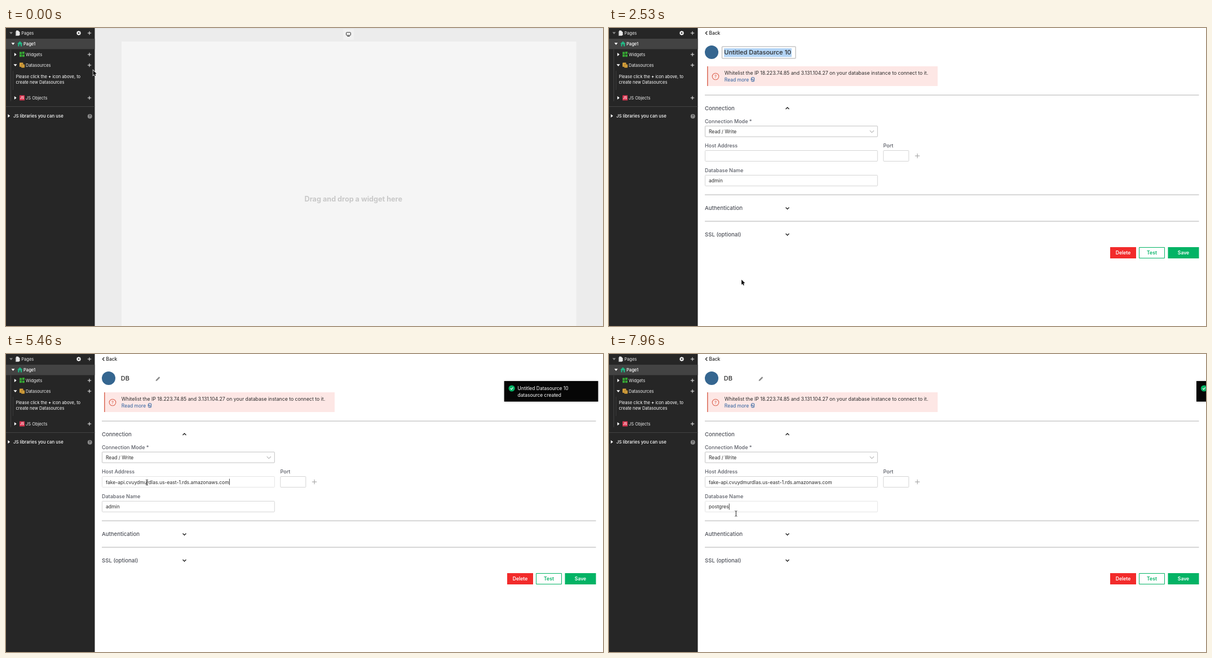
These frames come from a looping animation (1059x529 px, 7.99 s). An HTML page with a canvas:

```html
<!DOCTYPE html>
<html lang="en">
<head>
<meta charset="utf-8">
<title>Connect a datasource</title>
<style>
html, body { margin: 0; width: 100%; height: 100%; overflow: hidden; background: #fff; }
canvas { display: block; width: 1059px; height: 529px; }
</style>
</head>
<body>
<canvas id="stage"></canvas>
<script>
const W = 1059, H = 529, LOOP = 7990;
const canvas = document.getElementById('stage');
const dpr = window.devicePixelRatio || 1;
canvas.width = W * dpr;
canvas.height = H * dpr;
const c = canvas.getContext('2d');

const GREEN = '#03b365', ORANGE = '#e3723c', PG = '#356690', INK = '#2b2b2b';
const HOST = 'fake-api.cvuydmurdlas.us-east-1.rds.amazonaws.com';

// Drawing helpers
function rect(x, y, w, h, fill) {
  c.fillStyle = fill;
  c.fillRect(x, y, w, h);
}
function box(x, y, w, h, fill, stroke, r = 0, lw = 1) {
  c.beginPath();
  c.roundRect(x, y, w, h, r);
  if (fill) { c.fillStyle = fill; c.fill(); }
  if (stroke) { c.strokeStyle = stroke; c.lineWidth = lw; c.stroke(); }
}
function disc(x, y, r, fill, stroke, lw = 1) {
  c.beginPath();
  c.arc(x, y, r, 0, Math.PI * 2);
  if (fill) { c.fillStyle = fill; c.fill(); }
  if (stroke) { c.strokeStyle = stroke; c.lineWidth = lw; c.stroke(); }
}
function line(pts, color, lw = 1) {
  c.beginPath();
  for (let i = 0; i < pts.length; i += 2) c.lineTo(pts[i], pts[i + 1]);
  c.strokeStyle = color;
  c.lineWidth = lw;
  c.stroke();
}
function poly(pts, fill, stroke, lw = 1) {
  c.beginPath();
  for (let i = 0; i < pts.length; i += 2) c.lineTo(pts[i], pts[i + 1]);
  c.closePath();
  if (stroke) { c.strokeStyle = stroke; c.lineWidth = lw; c.stroke(); }
  c.fillStyle = fill;
  c.fill();
}
// y is the middle of the capitals; returns the right edge
function text(s, x, y, size, color, weight = 400) {
  c.font = `${weight} ${size}px Inter, Roboto, sans-serif`;
  c.fillStyle = color;
  c.fillText(s, x, y + size * 0.36);
  return x + c.measureText(s).width;
}
function centered(s, x, y, size, color, weight) {
  c.textAlign = 'center';
  text(s, x, y, size, color, weight);
  c.textAlign = 'left';
}
function plus(x, y, r, color, lw = 1) {
  line([x - r, y, x + r, y], color, lw);
  line([x, y - r, x, y + r], color, lw);
}
function chevron(x, y, w, dir, color, lw) {
  line([x - w, y - w / 2 * dir, x, y + w / 2 * dir, x + w, y - w / 2 * dir], color, lw);
}
function caretRight(x, y, color) { poly([x - 1.7, y - 3, x - 1.7, y + 3, x + 2.2, y], color); }
function caretDown(x, y, color) { poly([x - 3, y - 1.8, x + 3, y - 1.8, x, y + 2], color); }
function tick(x, y, r, color, lw) {
  line([x - r * 0.5, y, x - r * 0.1, y + r * 0.4, x + r * 0.5, y - r * 0.35], color, lw);
}

// Sidebar
function gear(x, y) {
  for (let i = 0; i < 4; i++) {
    const a = i * Math.PI / 4, dx = Math.cos(a) * 4, dy = Math.sin(a) * 4;
    line([x - dx, y - dy, x + dx, y + dy], '#eee', 1.7);
  }
  disc(x, y, 3.1, '#eee');
  disc(x, y, 1.3, '#262626');
}
function sidebar(t) {
  const hover = t >= 60 && t < 2530, onPlus = hover && t < 1200;
  rect(0, 0, 157.5, H, '#262626');
  rect(0, 19, 157.5, 18.5, '#434343');
  if (hover) rect(0, 56.5, 157.5, 19, '#373737');
  if (onPlus) rect(138.5, 56.5, 19, 19, '#1c1c1c');
  line([8.5, 38, 8.5, 130], '#414141');
  line([12.5, 76, 12.5, 110], '#3a3a3a');
  line([0, 139.5, 157.5, 139.5], '#434343');

  caretDown(9, 9, '#888');
  poly([18, 4.5, 21.5, 4.5, 24.5, 7.5, 24.5, 13, 18, 13], '#e8e8e8');
  line([17.3, 6, 17.3, 13.5, 23, 13.5], '#aaa');
  text('Pages', 27.3, 9, 7.5, '#eee');
  gear(129, 9);
  caretDown(12.5, 28, '#fff');
  poly([20, 28, 24.7, 23.6, 29.4, 28, 28.2, 28, 28.2, 32.5, 25.9, 32.5, 25.9, 29, 23.5, 29, 23.5, 32.5, 21.3, 32.5, 21.3, 28], '#22b583');
  text('Page1', 31, 28, 7.6, '#fff', 500);

  caretRight(16.5, 47, '#fff');
  for (const [x, y] of [[24, 42.5], [28.8, 42], [24, 47.2], [28.8, 47.2]]) rect(x, y, 4, 4, '#36a733');
  text('Widgets', 35, 47, 7.5, '#eee');
  caretDown(16.5, 66, '#fff');
  box(24, 61.5, 6.5, 7.5, '#d9a13b', null, 1);
  box(27, 64.5, 6, 6, '#f0b648', '#6b4e17', 1, 0.6);
  line([28.3, 66.5, 31.7, 66.5], '#6b4e17', 0.7);
  line([28.3, 68.6, 31.7, 68.6], '#6b4e17', 0.7);
  text('Datasources', 35, 66, 7.5, '#eee');
  let x = text('Please click the ', 17.5, 86.3, 7.5, '#fff');
  x = text('+', x, 86.3, 7.5, '#fff', 700);
  text(' icon above, to', x, 86.3, 7.5, '#fff');
  text('create new Datasources', 17.5, 96.6, 7.5, '#fff');
  caretRight(16.5, 124, '#fff');
  rect(24, 119.5, 9, 9, '#d9344f');
  centered('JS', 28.5, 124.4, 5.5, '#fff', 600);
  text('JS Objects', 35, 124, 7.5, '#eee');
  for (const y of [9, 47, 66, 124]) plus(148, y, 3.2, '#eee');
  caretRight(5, 156, '#fff');
  text('JS libraries you can use', 13, 156, 7.8, '#fff', 500);
  disc(148.7, 156.7, 4, '#8a8a8a');
  centered('?', 148.7, 156.9, 6, '#262626', 600);
}

// Pages
function emptyCanvas() {
  rect(157, 0, W - 157, H, '#ececec');
  rect(157, 0, W - 157, 1.5, '#e3e3e3');
  rect(205, 24, 806.5, H, '#f5f5f5');
  box(598, 2, 19, 19, '#f1f1f1');
  box(603.6, 7.8, 7.8, 5.2, null, '#333', 0.8);
  line([605.3, 14.6, 609.7, 14.6], '#333', 1.1);
  text('Drag and drop a widget here', 529.5, 303, 12.65, '#c8c8c8', 700);
}
function back() {
  line([174.3, 6, 171.3, 9, 174.3, 12], '#222', 1.2);
  text('Back', 177.5, 9, 8.3, '#222', 500);
}
function shield(x, y) {
  c.beginPath();
  c.moveTo(x, y - 7.5);
  c.lineTo(x + 6.5, y - 5);
  c.quadraticCurveTo(x + 7, y + 4, x, y + 8);
  c.quadraticCurveTo(x - 7, y + 4, x - 6.5, y - 5);
  c.fillStyle = '#0bac63';
  c.fill();
  tick(x, y, 5.5, '#fff', 1.5);
}
function drum(x, y) {
  for (let i = 2; i >= 0; i--) {
    const yy = y + i * 4.6 - 4.6;
    c.beginPath();
    c.ellipse(x, yy + 2, 6.8, 2.6, 0, 0, Math.PI);
    c.ellipse(x, yy - 1, 6.8, 2.6, 0, Math.PI, 0);
    c.fillStyle = '#b9b9b9';
    c.fill();
    c.beginPath();
    c.ellipse(x, yy - 1, 6.8, 2.4, 0, 0, Math.PI * 2);
    c.fillStyle = '#d6d6d6';
    c.fill();
  }
}
function illustration() {
  disc(867, 142, 30, null, '#dcdcdc', 1.2);
  drum(883, 122);
  drum(840, 157);
  drum(889.5, 161);
  for (const [x, y, r, color] of [[878.5, 115.5, 4, PG], [845, 149.5, 3, '#3f9c46'], [895, 155, 3, '#7d97a8']]) {
    disc(x, y, 7, '#f6f6f6', '#d8d8d8', 0.8);
    disc(x, y, r, color);
  }
  rect(859, 134.5, 16, 16.5, '#e8562f');
  disc(871.3, 135, 4, '#5fba2f');
  tick(871.3, 135, 3.6, '#fff', 0.9);
}
function item(x, y, name, shape, color) {
  disc(x, y, 12.5, '#ececec');
  if (shape === 'disc') disc(x, y, 8, color);
  if (shape === 'square') rect(x - 7.5, y - 7.5, 15, 15, color);
  if (shape === 'plus') plus(x, y, 6, '#111', 2.6);
  if (shape === 'cloud') {
    disc(x - 4, y + 1.3, 3.8, color);
    disc(x - 0.3, y - 1.4, 4.7, color);
    disc(x + 4.4, y + 1.6, 3.5, color);
    rect(x - 4, y + 1, 8.4, 4.1, color);
  }
  text(name, x + 17.7, y, 9.65, INK, 500);
}
function catalog(t) {
  back();
  text('Datasources', 170, 39.5, 11.45, INK, 500);
  text('Active', 170, 73.3, 8.5, '#8a8a8a');
  plus(215.2, 73, 3.2, '#777', 0.9);
  text('Create New', 222, 73.3, 8.35, '#222', 600);
  rect(212, 80.6, 58, 1.5, ORANGE);

  box(170.7, 90.5, 749, 99.2, '#fff', '#cbcbcb', 0, 1.4);
  shield(192.5, 115.5);
  text('Secure & fast database connection', 205.5, 116, 14.27, INK, 600);
  text('Connect your database to start building read/write', 186, 136.8, 8.46, '#4c4c4c');
  text('workflows. Your Passwords are fully encrypted and we', 186, 149.4, 8.46, '#4c4c4c');
  text('never store any of your data. That’s a promise.', 186, 162, 8.46, '#4c4c4c');
  illustration();

  for (const [s, y] of [['Sample Databases', 211.5], ['APIs', 297.5], ['Databases', 422.5]])
    text(s, 170, y, 10.75, INK, 500);
  disc(189, 238, 6, '#4aa24c');
  text('movies', 203, 238.7, 9.8, INK, 500);
  text('This contains a standard movies collection', 181.5, 258.6, 8.64, '#707070');
  disc(442, 238, 7, PG);
  text('users', 455.5, 238.7, 9.8, INK, 500);
  text('This contains a standard users information', 434.7, 258.6, 8.64, '#707070');

  const [a, b, d] = [187.8, 441.2, 694.6];
  item(a, 330.5, 'Create new API', 'plus');
  item(b, 330.5, 'CURL import', 'disc', '#16414f');
  item(d, 330.5, 'Authenticated API', 'cloud', '#3a90bd');
  item(a, 381, 'Lumbra Sheets', 'square', '#11b254');
  item(a, 455.5, 'PostgreSQL', 'disc', PG);
  item(b, 455.5, 'MongoDB', 'disc', '#4aa24c');
  item(d, 455.5, 'Mysql', 'disc', '#5d87a1');
  item(a, 506, 'ElasticSearch', 'disc', '#f3c02b');
  item(b, 506, 'TavimoDB', 'disc', '#2a66ac');
  item(d, 506, 'Redis', 'square', '#c9291d');

  if (t >= 1300) rect(920.5, 90, 2, H, '#e6e6e6');
  rect(932.8, 90, 1.6, 19.5, ORANGE);
  text('Sample Databases', 938.5, 99.8, 8.35, '#222', 600);
  text('API', 938.5, 120, 8.5, '#8a8a8a', 500);
  text('Database', 938.5, 140, 8.5, '#8a8a8a', 500);
}

function blink(t, since) { return Math.floor((t - since) / 530) % 2 === 0; }
function typed(t, keys) { return keys.filter(k => t >= k).length; }

function nameField(t) {
  if (t >= 3890) {
    text('DB', 203.8, 43.5, 11, INK, 500);
    line([267, 46.6, 272.4, 41.2], '#8a8a8a', 2.6);
    poly([265.6, 48, 266, 45.4, 268.2, 47.6], '#8a8a8a');
    return;
  }
  box(200.5, 33, 130.5, 21, '#fff', '#a9a9a9', 0.5);
  const n = typed(t, [3190, 3260]);
  if (!n) rect(204, 36, 120, 15.5, '#b3d4f5');
  const end = text(n ? 'DB'.slice(0, n) : 'Untitled Datasource 10', 204.3, 43.5, 11, INK, 500);
  if (n && blink(t, 3360)) rect(end + 0.3, 37.5, 0.8, 12, '#222');
}
function caretAt(x, y) { rect(x + 0.2, y - 5.5, 0.8, 11, '#111'); }
function databaseField(t) {
  const n = typed(t, [6790, 6860, 7030, 7230, 7290, 7490, 7560, 7690]);
  const selected = t >= 6400 && !n;
  if (selected) rect(177, 265, 25, 12, '#b3d4f5');
  const end = text(n ? 'postgres'.slice(0, n) : 'admin', 177, 271.3, 8.6, INK);
  if (t >= 6190 && !selected && (n || blink(t, 6190))) caretAt(end, 271);
}
function form(t) {
  back();
  disc(182, 43, 12, PG);
  nameField(t);

  rect(174, 68, 409, 35, '#fde7e5');
  rect(174, 68, 1.6, 35, '#dc6f5e');
  disc(189, 86, 5.8, null, '#dc6350', 1.1);
  centered('?', 189, 86.1, 7.5, '#dc6350', 500);
  text('Whitelist the IP 18.223.74.85 and 3.131.104.27 on your database instance to connect to it.', 204.8, 79.8, 8.7, INK);
  text('Read more', 204.8, 91.7, 8.5, '#2b5f9e');
  box(252.6, 87.8, 5, 7, null, '#2b5f9e', 1);
  line([251.5, 91, 255.5, 91, 255.5, 94], '#2b5f9e', 1);

  for (const y of [119, 296, 343]) rect(170, y - 0.7, 876.5, 1.6, '#cecece');
  text('Connection', 170, 142.8, 9.6, '#4c4f57', 500);
  text('Authentication', 170, 320, 9.6, '#4c4f57', 500);
  text('SSL (optional)', 170, 366.6, 9.6, '#4c4f57', 500);
  chevron(316.5, 142.5, 3, -1, '#222', 1.4);
  chevron(316.5, 320, 3, 1, '#222', 1.4);
  chevron(316.5, 366.5, 3, 1, '#222', 1.4);

  for (const [s, x, y] of [['Connection Mode *', 170, 165.3], ['Host Address', 170, 209], ['Port', 486.5, 209], ['Database Name', 170, 252.5]])
    text(s, x, y, 9, '#5a5d66', 500);
  const onHost = t >= 4860 && t < 6190, onDb = t >= 6190;
  box(170.5, 174, 305.8, 19, '#fff', '#c2c2c2', 1);
  box(170.5, 217.5, 305.8, 19, '#fff', onHost ? '#e4e4e4' : '#d4d4d4', 1);
  box(486.8, 217.5, 45, 19, '#fff', '#d4d4d4', 1);
  box(170.5, 261.3, 305.8, 19, '#fff', onDb ? '#e4e4e4' : '#d4d4d4', 1);
  text('Read / Write', 177, 183.8, 8.5, INK);
  chevron(466.3, 183.8, 3.6, 1, '#888', 0.9);
  plus(547, 227, 4.2, '#999');
  const hostEnd = t >= 5120 ? text(HOST, 177, 227.6, 8.55, INK) : 177;
  if (onHost && blink(t, t < 5000 ? 4860 : 4970)) caretAt(hostEnd, 227);
  databaseField(t);

  rect(889, 389, 46, 20, '#f22b2b');
  box(940.5, 389.5, 45, 19, '#fff', GREEN);
  rect(991.5, 389, 55, 20, GREEN);
  centered('Delete', 912, 399.2, 8.6, '#fff', 600);
  centered('Test', 963, 399.2, 8.6, GREEN, 600);
  centered('Save', 1019, 399.2, 8.6, '#fff', 600);
}

// Easing
const clamp = p => Math.min(1, Math.max(0, p));
const linear = p => p;
const easeIn = p => p ** 1.6;
const easeOut = p => 1 - (1 - p) ** 3;
const easeInOut = p => p < 0.5 ? 2 * p * p : 1 - 2 * (1 - p) ** 2;

function toast(t) {
  const enter = easeOut(clamp((t - 2615) / 375)), leave = easeOut(clamp((t - 7620) / 700));
  const x = 883.7 + 183 * (1 - enter + leave);
  if (x >= W) return;
  c.save();
  c.shadowColor = 'rgba(0,0,0,.18)';
  c.shadowBlur = 4;
  rect(x, 48, 166.7, 36.5, '#060606');
  c.restore();
  disc(x + 13.4, 61, 5.6, GREEN);
  tick(x + 13.4, 61, 4.6, '#fff', 1.1);
  text('Untitled Datasource 10', x + 23.8, 60.8, 8.45, '#fff');
  text('datasource created', x + 23.8, 72.7, 8.45, '#fff');
}

// Pointer stops: time, x, y, easing of the way there
const stops = [
  [0, 154.5, 75],
  [60, 152.5, 71.5, linear],
  [760, 152.5, 71.5, linear],
  [790, 155.5, 74.5, linear],
  [1130, 155.5, 74.5, linear],
  [1730, 233, 418.5, easeInOut],
  [1890, 235, 446.7, easeOut],
  [3890, 235, 446.7, linear],
  [4530, 255, 322.7, easeIn],
  [4660, 254, 252, linear],
  [4830, 250, 228, easeOut],
  [5730, 250, 228, linear],
  [6130, 223, 271, easeInOut],
  [7700, 223, 271, linear],
  [7900, 225.3, 283.3, easeInOut],
  [LOOP, 225.3, 283.3, linear],
];
function pointerAt(t) {
  const i = Math.max(1, stops.findIndex(s => s[0] >= t));
  const [t0, x0, y0] = stops[i - 1], [t1, x1, y1, ease] = stops[i];
  const p = ease((t - t0) / (t1 - t0));
  return [x0 + (x1 - x0) * p, y0 + (y1 - y0) * p];
}
function arrow() {
  poly([0, 0, 0, 9, 2, 7.2, 3.4, 10.2, 4.9, 9.5, 3.6, 6.6, 6.3, 6.4], '#111', '#fff', 1.4);
}
function hand() {
  c.beginPath();
  c.moveTo(0, 0.8);
  c.quadraticCurveTo(1, -0.6, 2, 0.8);
  c.lineTo(2.2, 3.6);
  c.lineTo(5.6, 4.2);
  c.quadraticCurveTo(6.8, 4.6, 6.6, 6.2);
  c.lineTo(5.6, 9.8);
  c.lineTo(1, 9.8);
  c.lineTo(-2.4, 6);
  c.quadraticCurveTo(-2.2, 4.6, 0, 6);
  c.closePath();
  c.fillStyle = '#fff';
  c.fill();
  c.strokeStyle = '#111';
  c.lineWidth = 0.9;
  c.stroke();
}
function beam() {
  line([-2, -5, 0, -4, 2, -5], '#222', 0.9);
  line([-2, 5, 0, 4, 2, 5], '#222', 0.9);
  line([0, -4, 0, 4], '#222', 1);
}
function pointer(t) {
  const [x, y] = pointerAt(t);
  const overPlus = t >= 60 && t < 1170, overCard = t < 2530 && y > 431;
  const overHost = t > 4530 && y < 238;
  c.save();
  c.translate(x, y);
  if (overPlus || overCard) hand();
  else if (overHost || t > 5900) beam();
  else arrow();
  c.restore();
}

function draw(now) {
  const t = now % LOOP;
  c.setTransform(dpr, 0, 0, dpr, 0, 0);
  rect(0, 0, W, H, '#fff');
  if (t < 200) emptyCanvas();
  else if (t < 2530) catalog(t);
  else {
    form(t);
    toast(t);
  }
  sidebar(t);
  pointer(t);
}

const start = performance.now();
function loop() {
  draw(performance.now() - start);
  requestAnimationFrame(loop);
}
loop();
</script>
</body>
</html>
```
